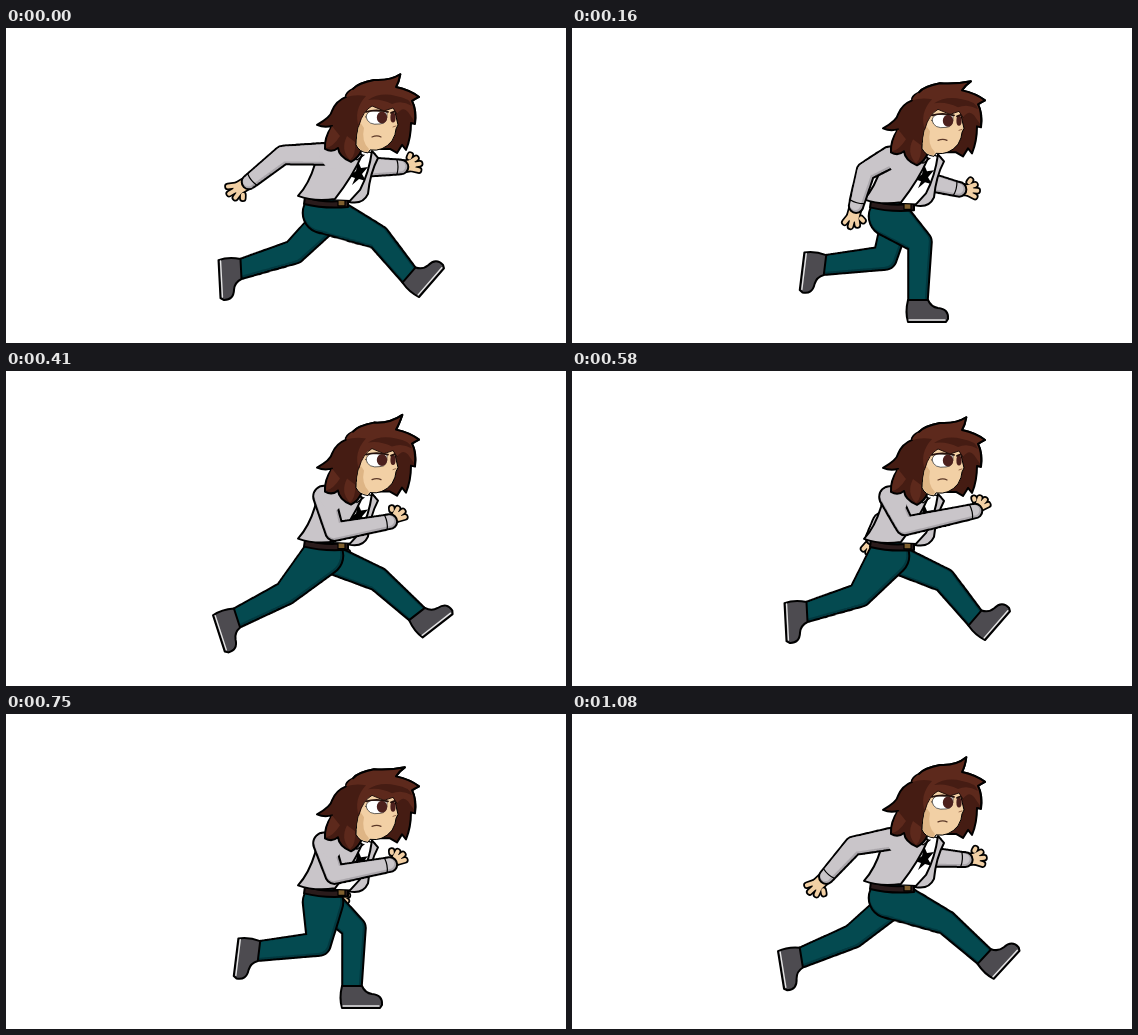
These frames come from a looping animation (560 px wide and 315 px high, 1.16 s). An HTML page with a canvas:

```html
<!DOCTYPE html>
<html lang="en">
<head>
<meta charset="utf-8">
<title>Run cycle</title>
<style>
html, body { margin: 0; overflow: hidden; background: #fff; }
canvas { display: block; }
</style>
</head>
<body>
<canvas id="stage" width="560" height="315"></canvas>
<script>
const ctx = document.getElementById("stage").getContext("2d");
const INK = "#000", SKIN = "#f2d0a5", TAN = "#deb585";
const HAIR = "#451c13", HAIR_LIGHT = "#5d291c";
const JACKET = "#c9c5c9", JACKET_SHADE = "#aba7ac";
const PANTS = "#044a50", PANTS_SHADE = "#02383f";
const POSES = 14;

// Stride key points: pose, knee x, y, ankle x, y, foot angle.
const stride = [
  [0, 372, 209, 403, 247, -49], [2, 348, 214, 346, 272, 0],
  [4, 304, 228, 272, 257, 40], [5, 280, 222, 231, 247, 72],
  [7, 288, 224, 235, 241, 87], [9, 313, 230, 253, 237, 97],
  [11, 366, 205, 382, 257, -25], [12, 372, 208, 411, 243, -38]
];

// Arm swings as cosine series: mean, then one, two and three beats a loop.
const nearArm = {
  shoulder: [318, 126, 11.5],
  elbow: [[310, -28, -5], [150, -14, -9]],
  wrist: [[332, -80, -9], [161, 13, -14, -6]],
  twist: [-14, 22], reach: [22, 4]
};
const farArm = {
  shoulder: [354, 137, 9],
  elbow: [[338, 28], [155, -6, -10]],
  wrist: [[356, 47, -8], [167, -14, -14]],
  twist: [-10], reach: [20, 2]
};

const wave = (series, pose) => series.reduce(
  (sum, size, beat) => sum + size * Math.cos(beat * pose * 2 * Math.PI / POSES), 0);

// Smooth closed curve through the stride key points.
function strideAt(pose) {
  const n = stride.length;
  const i = stride.findLastIndex(key => key[0] <= pose);
  const [p, a, b, q] = [-1, 0, 1, 2].map(k => stride[(i + k + n) % n]);
  const t = (pose - a[0]) / ((b[0] - a[0] + POSES) % POSES);
  return a.map((v, k) => v + t / 2 * (b[k] - p[k]
    + t * (2 * p[k] - 5 * v + 4 * b[k] - q[k] + t * (3 * (v - b[k]) + q[k] - p[k])))).slice(1);
}

function shape(d, fill, outline = 2) {
  const path = new Path2D(d);
  ctx.fillStyle = fill;
  ctx.fill(path);
  if (outline) line(path, outline);
}

function line(path, width, color = INK) {
  ctx.lineWidth = width;
  ctx.strokeStyle = color;
  ctx.stroke(typeof path === "string" ? new Path2D(path) : path);
}

// Sweeps a circle of changing radius along the joints.
function sweep(joints, grow, color, shift = 0) {
  ctx.fillStyle = color;
  ctx.beginPath();
  for (let j = 1; j < joints.length; j++) {
    const a = joints[j - 1], b = joints[j];
    const steps = Math.ceil(Math.hypot(b[0] - a[0], b[1] - a[1]));
    for (let k = 0; k <= steps; k++) {
      const [x, y, r] = a.map((v, n) => v + (b[n] - v) * k / steps);
      ctx.moveTo(x + r, y);
      ctx.arc(x + shift, y + shift, Math.max(r + grow, 1), 0, 7);
    }
  }
  ctx.fill();
}

function limb(joints, color, shade) {
  sweep(joints, 0.3, INK);
  sweep(joints, -1.7, shade);
  sweep(joints, -2.8, color, -0.8);
}

function placed(x, y, angle, draw) {
  ctx.save();
  ctx.translate(x, y);
  ctx.rotate(angle);
  draw();
  ctx.restore();
}

function leg(pose, hip) {
  const [kx, ky, ax, ay, angle] = strideAt(pose % POSES);
  limb([hip, [kx, ky, 12.5], [ax, ay, 10.5]], PANTS, PANTS_SHADE);
  placed(ax, ay, angle * Math.PI / 180, () => {
    shape("M-10 0L10 0Q13 7 20 8Q31 9 30 19L28 22L-10 22Q-13 12 -10 0Z", "#4d4b50");
    line("M-9 20L27 20", 1.4, "#e4e4e4");
  });
}

function hand(length) {
  const palm = length * 0.45, r = Math.min(7, length * 0.3);
  const fingers = [[-0.4, 0.9], [0, 1], [0.4, 0.93], [-1, 0.7]];
  for (const [edge, color] of [[1.7, INK], [0, SKIN]]) {
    line(`M0 0L${palm} 0`, 2 * (r - 1.5 + edge), color);
    for (const [turn, reach] of fingers) {
      const size = length * reach - palm - 3;
      line(`M${palm} ${turn * 8}l${size * Math.cos(turn)} ${size * Math.sin(turn)}`,
        4 + edge * 2, color);
    }
  }
}

function arm({ shoulder: [sx, sy, sr], elbow, wrist, twist, reach }, pose, bob) {
  const [ex, ey] = elbow.map(series => wave(series, pose));
  const [wx, wy] = wrist.map(series => wave(series, pose));
  const aim = Math.atan2(wy - ey, wx - ex);
  placed(wx, wy, aim + wave(twist, pose) * Math.PI / 180, () => hand(wave(reach, pose)));
  limb([[sx, sy + bob, sr], [ex, ey, 10], [wx, wy, 8]], JACKET, JACKET_SHADE);
  placed(wx, wy, aim, () => line("M-4 -7Q-2 0 -4 7", 1.2));
}

function torso() {
  shape("M299 169Q320 176 342 172L342 179Q318 181 298 176Z", "#2a1b1b");
  shape("M332 171L339 171L339 178L332 178Z", "#80602f", 1.2);
  shape("M356 122L369 126L361 160L350 173L327 172L340 150Z", "#fff", 1.2);
  shape("M352 133L355 140L362 139L356 146L360 153L353 151L346 157L349 150L343 148L350 143Z", INK, 0);
  shape("M366 123L372 130Q364 145 362 166Q357 177 343 174L354 162Q363 145 366 123Z", JACKET);
  shape("M346 119L356 127Q347 148 329 171Q308 174 292 168Q303 156 309 136Q312 118 322 114Z", JACKET);
  line("M344 120L351 132L358 127", 1.2);
}

function head(phase) {
  const turn = 2 * Math.PI / 7;
  const tip = `${397 + 3 * Math.cos((phase - 3) * turn)} ${47 + 3 * Math.cos((phase - 2) * turn)}`;
  const top = `Q352 55 368 52Q384 53 ${tip}Q393 54 390 59Q404 62 413 69Q409 71 406 73`;
  shape(`M311 97Q325 89 326 83Q330 73 340 69Q339 65 347 61${top}Q411 83 409 96L405 95` +
    "Q405 110 400 122L396 117L391 125L384 121L356 121Q353 130 345 134" +
    "Q333 129 332 120Q326 125 319 121Q318 110 326 98Q318 100 311 97Z", HAIR);
  shape("M326 98Q320 110 320 120Q327 119 334 108Z", HAIR_LIGHT, 0);
  shape("M341 108Q334 122 344 132Q350 127 349 114Z", HAIR_LIGHT, 0);
  shape("M354 92Q350 108 350 117Q353 124 362 125L364 122Q377 124 386 113Q390 106 390 101L392 97L388 80L372 76L358 80Z", SKIN, 1);
  shape("M354 94Q350 108 351 117Q354 123 361 124L363 121Q355 113 358 100Z", TAN, 0);

  shape("M360 89Q361 83 367 83L381 84Q382 96 374 96Q362 98 360 89Z", "#fff", 0.6);
  ctx.fillStyle = "#4c201d";
  ctx.beginPath();
  ctx.ellipse(376, 89.5, 5.2, 6, 0, 0, 7);
  ctx.ellipse(387, 89.5, 2.6, 5, 0, 0, 7);
  ctx.fill();
  line("M360 84Q370 81 382 84M385 85L390 83", 1.8, "#24100c");
  line("M366 109Q371 107 375 109", 1.2, "#5b3828");
  line("M387 99L390 98", 0.8, "#80553a");

  shape(`M347 61${top}Q410 80 409 94L402 84Q397 78 391 86L387 80L378 83L366 78` +
    "Q356 83 353 99Q347 82 360 68Q350 66 340 69Q341 65 347 61Z", HAIR_LIGHT, 0);
  line(`M347 61${top}Q410 80 409 94`, 2);
  line("M391 86L387 80L378 83L366 78Q357 83 353 97", 1, "#24100c");
  shape("M362 72Q374 64 390 68Q404 70 406 78Q396 72 386 76Q374 70 362 72Z", HAIR, 0);
}

function draw(time) {
  // Twelve poses a second, on a clock that ticks every 10 ms.
  const ticks = Math.floor((time % 1160) / 10);
  const pose = Math.floor((ticks + 0.999) * 0.12) % POSES;
  const phase = pose % 7;
  const bob = 1.2 + 2.3 * Math.cos((phase - 2.4) * 2 * Math.PI / 7);
  ctx.fillStyle = "#fff";
  ctx.fillRect(0, 0, 560, 315);
  ctx.lineJoin = ctx.lineCap = "round";

  arm(farArm, pose, bob);
  leg(pose + 7, [324, 188 + bob, 15]);
  leg(pose, [317, 185 + bob, 21]);
  placed(0, bob, 0, torso);
  arm(nearArm, pose, bob);
  // Joins the sleeve to the jacket without a seam.
  sweep([[322, 126 + bob, 9], [326, 132 + bob, 9]], 0, JACKET);
  placed(0, bob, 0, () => head(phase));
}

function loop(now) {
  draw(now);
  requestAnimationFrame(loop);
}
draw(0);
requestAnimationFrame(loop);
</script>
</body>
</html>
```
